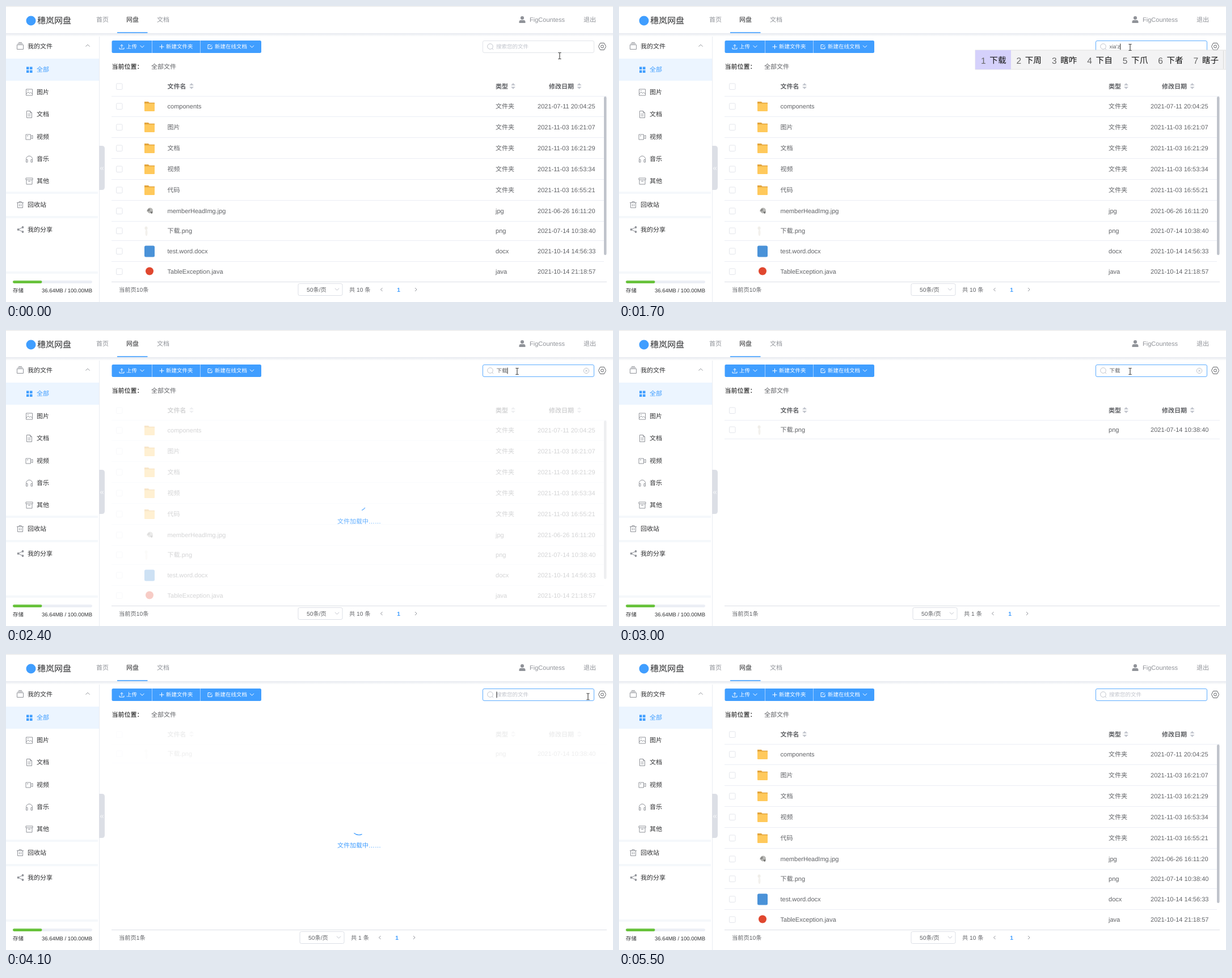
Animation of 1070 by 523 pixels, one loop 6 s. Source, as an HTML page:

```html
<!DOCTYPE html>
<html lang="zh-CN">
<head>
<meta charset="utf-8">
<title>网盘文件搜索</title>
<style>
html, body { margin: 0; width: 100%; height: 100%; overflow: hidden; background: #fff; }
svg { display: block; width: 1070px; height: 523px; }
text { font-family: "Liberation Sans", "Noto Sans CJK SC", "Noto Sans CJK", sans-serif; text-rendering: geometricPrecision; white-space: pre; }
</style>
</head>
<body>
<svg id="stage" viewBox="0 0 1070 523" xmlns="http://www.w3.org/2000/svg"></svg>
<script>
const BLUE = '#409eff', GREY = '#909399', TEXT = '#606266', DARK = '#303133', PALE = '#c0c4cc', LINE = '#ebeef5', EDGE = '#dcdfe6';
const LOOP = 6000, STEP = 100;

// Markup helpers
const label = (x, cy, str, fill = TEXT, size = 11.04, extra = '') =>
  `<text x="${x}" y="${cy + size * 0.36}" font-size="${size}" fill="${fill}" ${extra}>${str}</text>`;
const rect = (x, y, w, h, fill, extra = '') =>
  `<rect x="${x}" y="${y}" width="${w}" height="${h}" fill="${fill}" ${extra}/>`;
const stroke = (d, color, w = 1, extra = '') =>
  `<path d="${d}" fill="none" stroke="${color}" stroke-width="${w}" ${extra}/>`;
const circle = (x, y, r, fill, extra = '') => `<circle cx="${x}" cy="${y}" r="${r}" fill="${fill}" ${extra}/>`;
const group = (id, body) => `<g id="${id}">${body}</g>`;
const at = (x, y, body) => `<g transform="translate(${x} ${y})">${body}</g>`;
const hline = (x1, x2, y, color = LINE) => stroke(`M${x1} ${y}H${x2}`, color);
const chevron = (x, y, color, dir = 1) => stroke(`M${x - 3.5} ${y - 1.7 * dir}l3.5 ${3.5 * dir}l3.5 ${-3.5 * dir}`, color);
const bold = 'font-weight="700"', medium = 'font-weight="500"';

function header() {
  return rect(0, 0, 1070, 48, '#fff') + rect(0, 48, 1070, 6, 'url(#shade)') + rect(0, 0, 1070, 1, '#e6e6e6') +
    circle(44, 26, 8.5, BLUE) + label(55, 26, '穗岚网盘', DARK, 15, medium) +
    label(159, 24, '首页', GREY) + label(212, 24, '网盘', DARK) + label(266, 24, '文档', GREY) +
    rect(196, 46.2, 53.5, 1.6, BLUE) +
    circle(910, 21, 3.1, GREY) + `<path d="M904.5 30v-2q0-3 3-3h5q3 0 3 3v2z" fill="${GREY}"/>` +
    label(923, 24, 'FigCountess', GREY) + label(1018, 24, '退出', GREY);
}

const sideIcons = [
  [112, '全部', rect(-5, -5, 4.5, 4.5, BLUE) + rect(1, -5, 4.5, 4.5, BLUE) + rect(-5, 1, 4.5, 4.5, BLUE) + rect(1, 1, 4.5, 4.5, BLUE)],
  [152, '图片', stroke('M-5.5 -5.5h11v11h-11zM-5.5 3l3.5-3.5l2.5 2.5l2-2l3 3M-3 -3h1.5', GREY)],
  [191, '文档', stroke('M-4.5 -6h6l3 3v9h-9zM1.5 -6v3h3M-2.5 -.5h5M-2.5 2.5h5', GREY)],
  [231, '视频', stroke('M-6 -4.5h8.5v9h-8.5zM2.5 -1l3.5-2v6l-3.5-2M-4 -2h2', GREY)],
  [270, '音乐', stroke('M-5.5 1v-1a5.5 5.5 0 0 1 11 0v1M-5.5 1h2.5v4.5h-2.5zM3 1h2.5v4.5h-2.5z', GREY)],
  [309, '其他', stroke('M-6 -5.5h12v3h-12zM-5 -2.5v8h10v-8M-2 0h4', GREY)]
];

function sidebar() {
  let s = rect(0, 93, 164, 39, '#ecf5ff') + stroke('M164.5 50V523', '#e9ecf2') +
    at(25, 71, stroke('M-5.5 -2.5h11v8h-11zM-4.5 -4.5h9M-3 -6.5h6', GREY)) +
    label(38, 71, '我的文件', DARK) + chevron(144, 70, GREY, -1);
  for (const [y, name, icon] of sideIcons)
    s += at(41, y + 0.5, icon) + label(54, y, name, y === 112 ? BLUE : DARK);
  for (const y of [328, 371, 469]) s += rect(0, y, 162, 4, '#f5f8fb');
  return s +
    at(25, 351, stroke('M-6 -3.5h12M-2 -3.5v-2h4v2M-4.5 -3.5v9h9v-9M-1.5 -1v4M1.5 -1v4', GREY)) +
    label(38, 351, '回收站', DARK) +
    at(25.5, 395, stroke('M4 -4L-4 0L4 4', GREY) + circle(4, -4, 1.9, GREY) + circle(-4, 0, 1.9, GREY) + circle(4, 4, 1.9, GREY)) +
    label(38, 395, '我的分享', DARK) +
    rect(12, 485.2, 140, 4.7, LINE, 'rx="2.3"') + rect(12, 485.2, 51.5, 4.7, '#67c23a', 'rx="2.3"') +
    label(12, 503, '存储', DARK, 9.47) + label(63, 503, '36.64MB / 100.00MB', DARK, 9.47) +
    `<path d="M164 247h5q5 0 5 5v68q0 5-5 5h-5z" fill="${EDGE}"/>` +
    stroke('M168.5 284.5l-2 2.5l2 2.5M171.5 284.5l-2 2.5l2 2.5', '#fff');
}

function toolbar() {
  return rect(186.5, 61, 263.5, 22, BLUE, 'rx="2.5"') + stroke('M257.5 61v22M342.5 61v22', '#a5d0ff') +
    at(204, 72, stroke('M0 2v-5.5M-2.3 -1.5l2.3-2.3l2.3 2.3M-4 1.5v2.5h8v-2.5', '#fff')) +
    label(212, 72, '上传', '#fff', 9.5, medium) + chevron(240, 71.5, '#fff') +
    stroke('M270.5 72h8M274.5 68v8', '#fff') + label(282, 72, '新建文件夹', '#fff', 9.5, medium) +
    at(359.5, 72, stroke('M1 -3.5h-4.5v7h7v-4M-1 1l4.5-4.5', '#fff')) +
    label(368, 72, '新建在线文档', '#fff', 9.5, medium) + chevron(433.5, 71.5, '#fff') +
    label(186.5, 107, '当前位置：', '#000') + label(256, 107, '全部文件') +
    at(1051, 71.5, stroke('M-3.5 -6h7l3 6l-3 6h-7l-3-6z', TEXT, 1, 'stroke-linejoin="round"') + circle(0, 0, 2.5, 'none', `stroke="${TEXT}"`));
}

function searchBox() {
  return rect(840.5, 61.5, 196, 21, '#fff', `id="box" rx="2.5" stroke="${EDGE}" stroke-width=".85"`) +
    circle(853.5, 71.5, 4.8, 'none', `stroke="${PALE}"`) + stroke('M857 75l2 2.2', PALE) +
    label(864, 72, '搜索您的文件', PALE, 9.5, 'id="hint"') +
    label(864.5, 72, '', TEXT, 9.5, 'id="query"') +
    group('clear', circle(1023, 72, 4.7, 'none', `stroke="${PALE}"`) + stroke('M1021.2 70.2l3.6 3.6M1024.8 70.2l-3.6 3.6', PALE)) +
    rect(0, 66.5, 1, 11, '#222', 'id="caret"');
}

// File icons, centred on 0,0
const icons = {
  folder: '<path d="M-9 -8.5h7l1.5 1.7h9.5v5h-18z" fill="#e3a53d"/>' + rect(-9, -5.3, 18, 13.8, '#ffc95c', 'rx="1"'),
  photo: circle(1, -1, 5, '#b9b9b6') + '<path d="M-5 0q3-6 6-4l-1 4z" fill="#8c8c8a"/><path d="M1 1h5l-2 4z" fill="#6d6d6b"/>',
  sketch: '<ellipse cx="-6" cy="-5" rx="2.5" ry="3" fill="#f0eee9"/><ellipse cx="-5.5" cy="3" rx="2" ry="6" fill="#f3f1ed"/>',
  doc: rect(-9, -10, 18, 20, '#4a92d8', 'rx="2.5"'),
  code: circle(0, -1, 7, '#e0472f')
};
const files = [
  [177, 'folder', 'components', '文件夹', '2021-07-11 20:04:25', 195.5],
  [214, 'folder', '图片', '文件夹', '2021-11-03 16:21:07', 232.5],
  [251, 'folder', '文档', '文件夹', '2021-11-03 16:21:29', 269.5],
  [288, 'folder', '视频', '文件夹', '2021-11-03 16:53:34', 306.5],
  [325, 'folder', '代码', '文件夹', '2021-11-03 16:55:21', 343.5],
  [362, 'photo', 'memberHeadImg.jpg', 'jpg', '2021-06-26 16:11:20', 380.5],
  [397, 'sketch', '下载.png', 'png', '2021-07-14 10:38:40', 414.5],
  [433, 'doc', 'test.word.docx', 'docx', '2021-10-14 14:56:33', 451.5],
  [469, 'code', 'TableException.java', 'java', '2021-10-14 21:18:57', 0]
];
const found = [176, ...files[6].slice(1, 5), 192.5];

const tick = y => rect(194.5, y - 5, 10.5, 10.5, '#fff', `rx="1.5" stroke="${EDGE}" stroke-width=".8"`);
const sorter = x => `<path d="M${x - 4} 140.3l4-4l4 4zM${x - 4} 142.8l4 4l4-4z" fill="${PALE}"/>`;
const row = ([y, icon, name, type, date, line], right) =>
  tick(y) + at(253, y + 0.5, icons[icon]) + label(284.5, y, name) + label(863, y, type) + label(937, y, date) +
  (line ? hline(186, right, line) : '');

function table() {
  return tick(142) + label(284.5, 142, '文件名', TEXT, 11.04, bold) + sorter(327) +
    label(863, 142, '类型', TEXT, 11.04, bold) + sorter(894) +
    label(957, 142, '修改日期', TEXT, 11.04, bold) + sorter(1010.5) + hline(186, 1059, 159.5) +
    group('all', files.map(f => row(f, 1054)).join('') + rect(1054, 160, 4.5, 280, '#bfc3cb', 'rx="2.2"')) +
    group('hits', row(found, 1059));
}

function loading() {
  return group('load', rect(186, 124, 874, 362, '#fff', 'opacity=".9"') +
    at(622, 306.3, `<circle id="ring" r="20" fill="none" stroke="${BLUE}" stroke-width="2" stroke-linecap="round"/>`) +
    label(622.5, 338, '文件加载中……', BLUE, 11.04, 'text-anchor="middle"'));
}

function pager(id, count, d) {
  return group(id, label(199, 501, `当前页${count}条`, TEXT, 10.26) +
    rect(515 + d, 490.5, 78, 21, '#fff', `rx="2.5" stroke="${EDGE}"`) + label(530 + d, 501, '50条/页', TEXT, 10.26) +
    chevron(583.5 + d, 500.5, PALE) + label(605 + d, 501, `共 ${count} 条`, TEXT, 10.26) +
    stroke(`M${663.5 - d} 498l-3 3l3 3`, GREY) + label(692 - d, 501, '1', BLUE, 10.26, bold + ' text-anchor="middle"') +
    stroke(`M${721 - d} 498l3 3l-3 3`, GREY));
}

function popover() {
  const dots = [0, 3, 6].flatMap(x => [0, 3, 6].map(y => rect(1014.5 + x, 162.5 + y, 2, 2, TEXT))).join('');
  return group('pop', `<path d="M1046 90l5-4.5l5 4.5" fill="#fff" stroke="${LINE}"/>` +
    rect(936.5, 90, 130.5, 97, '#fff', `rx="3" stroke="${LINE}" filter="url(#soft)"`) +
    stroke('M947 109h9M947 112.5h9M947 116h9M950 107.5v3M953.5 111v3M949 114.5v3', TEXT) +
    label(960, 112, '设置显示字段') + hline(946, 1057.5, 127.5, EDGE) + label(946, 141.5, '查看模式', GREY) +
    rect(946.5, 155.5, 111, 21.5, '#fff', `rx="2.5" stroke="${EDGE}"`) + rect(946, 155, 56, 22.5, BLUE, 'rx="2.5"') +
    stroke('M959.5 162.5h7v8h-7zM961 165h4M961 168h4', '#fff', 0.9) + label(970, 166.5, '列表', '#fff', 9.5) +
    dots + label(1025, 166.5, '网格', TEXT, 9.5));
}

const cursors =
  group('beam', stroke('M-2.5 -5.5h2l.5 .5l.5 -.5h2M0 -5v10M-2.5 5.5h2l.5 -.5l.5 .5h2', '#222')) +
  group('hand', '<path d="M-1.2 0q1.2-1.6 2.4 0v5l4.8 1.2q1.2 .5 1 2l-1 4.8h-6l-4-5q-.8-1.6 .8-1.8l2 1.4z" fill="#fff" stroke="#111" stroke-width="1" stroke-linejoin="round"/>');

document.getElementById('stage').innerHTML =
  `<defs><linearGradient id="shade" x2="0" y2="1"><stop stop-color="#e6e9ef"/><stop offset="1" stop-color="#fff"/></linearGradient>
  <filter id="soft" x="-20%" y="-20%" width="140%" height="140%"><feDropShadow dx="0" dy="1.5" stdDeviation="3.5" flood-opacity=".1"/></filter></defs>` +
  rect(0, 0, 1070, 523, '#fff') + sidebar() + header() + toolbar() + searchBox() + table() + loading() +
  hline(186, 1059, 487.5, EDGE) + pager('pageAll', 10, 0) + pager('pageHits', 1, 3) + popover() + group('ime', '') + cursors;

const el = {};
document.querySelectorAll('#stage [id]').forEach(n => el[n.id] = n);
const show = (node, on) => node.setAttribute('display', on ? 'inline' : 'none');

// Typed text and the candidates offered for it
const typing = [
  [0, '', ''],
  [1300, 'x', '下 先 想 小 向 行 像'],
  [1400, 'xi', '系 西 洗 喜 细 吸 戏'],
  [1500, 'xia', '下 夏 下载 瞎 吓 下午 下面'],
  [1700, "xia'z", '下载 下周 瞎咋 下自 下爪 下者 瞎子'],
  [1900, "xia'zai", '下载 下在 夏在 下再 瞎在 吓在'],
  [2100, '下载', ''],
  [3870, '', '']
];
const path = [
  [0, 976, 88], [300, 940, 104], [600, 901, 73], [3100, 901, 73], [3400, 1053, 70],
  [3550, 1052, 71], [3700, 1023, 73], [3900, 1023, 73], [4200, 1027, 76]
];
const loads = [[2255, 2700], [3870, 5050]];

const clamp = v => Math.max(0, Math.min(1, v));
const ease = p => p * p * (3 - 2 * p);
const easeOut = p => 1 - (1 - p) ** 2;
const fade = (t, from, to, time) => Math.min(easeOut(clamp((t - from) / time)), 1 - easeOut(clamp((t - to) / time)));

function cursorAt(t) {
  const i = path.findIndex(p => p[0] > t);
  if (i < 0) return path[path.length - 1].slice(1);
  const [a, b] = [path[i - 1], path[i]], k = ease((t - a[0]) / (b[0] - a[0]));
  return [a[1] + (b[1] - a[1]) * k, a[2] + (b[2] - a[2]) * k];
}

function candidates(list) {
  if (!list) return '';
  const words = list.split(' '), widths = words.map(w => 34.7 + 13.86 * w.length);
  let x = 1065 - widths.reduce((a, b) => a + b, 0);
  let s = rect(x, 78, 1070 - x, 34, '#f3f3f4', 'stroke="#e2e2e2"') + rect(x, 78, widths[0] + 0.5, 34, '#d5d1fb');
  words.forEach((w, i) => {
    s += label(x + 10, 96, i + 1, '#666', 15.5) + label(x + 25.3, 96, w, '#111', 14.6);
    x += widths[i];
  });
  return s + stroke('M1065.5 79v32', '#d8d8d8');
}

function spin(ms) {
  const p = ms % 1500 / 1500, grow = ease(clamp(p * 2)), run = ease(clamp(p * 2 - 1));
  el.ring.setAttribute('transform', `scale(.663) rotate(${ms * 0.18})`);
  el.ring.setAttribute('stroke-dasharray', `${1 + 89 * grow} ${200 - 50 * grow}`);
  el.ring.setAttribute('stroke-dashoffset', -40 * grow - 80 * run);
}

let shown = null;
function draw(t) {
  const entry = typing.filter(e => e[0] <= t).pop(), [since, typed, list] = entry;
  if (entry !== shown) {
    el.query.textContent = typed;
    el.ime.innerHTML = candidates(list);
    shown = entry;
  }
  const focused = t >= 500;
  el.box.setAttribute('stroke', focused ? BLUE : EDGE);
  show(el.hint, !typed);
  show(el.clear, typed && !list);
  const blink = since ? t - since : t - 470;
  show(el.caret, focused && t < 5500 && Math.floor(blink / 530) % 2 === 0);
  el.caret.setAttribute('x', 864.5 + (typed ? el.query.getComputedTextLength() : 0));

  const hits = t >= loads[0][1] && t < loads[1][1];
  show(el.all, !hits);
  show(el.pageAll, !hits);
  show(el.hits, hits);
  show(el.pageHits, hits);

  const [start, end] = loads[t < 3500 ? 0 : 1], veil = fade(t, start, end, 260);
  show(el.load, veil > 0);
  el.load.setAttribute('opacity', veil);
  spin(Math.max(0, t - start));

  const pop = fade(t, 3380, 3695, 100);
  show(el.pop, pop > 0);
  el.pop.setAttribute('opacity', pop);

  const [x, y] = cursorAt(t), pointing = t >= 3300 && t < 4100;
  show(el.hand, pointing);
  show(el.beam, !pointing && t < 5500);
  (pointing ? el.hand : el.beam).setAttribute('transform', `translate(${x} ${y})`);
}

const begin = performance.now();
function nextFrame() {
  const t = (performance.now() - begin) % LOOP;
  draw(Math.floor(t / STEP) * STEP);
  requestAnimationFrame(nextFrame);
}
nextFrame();
</script>
</body>
</html>
```
